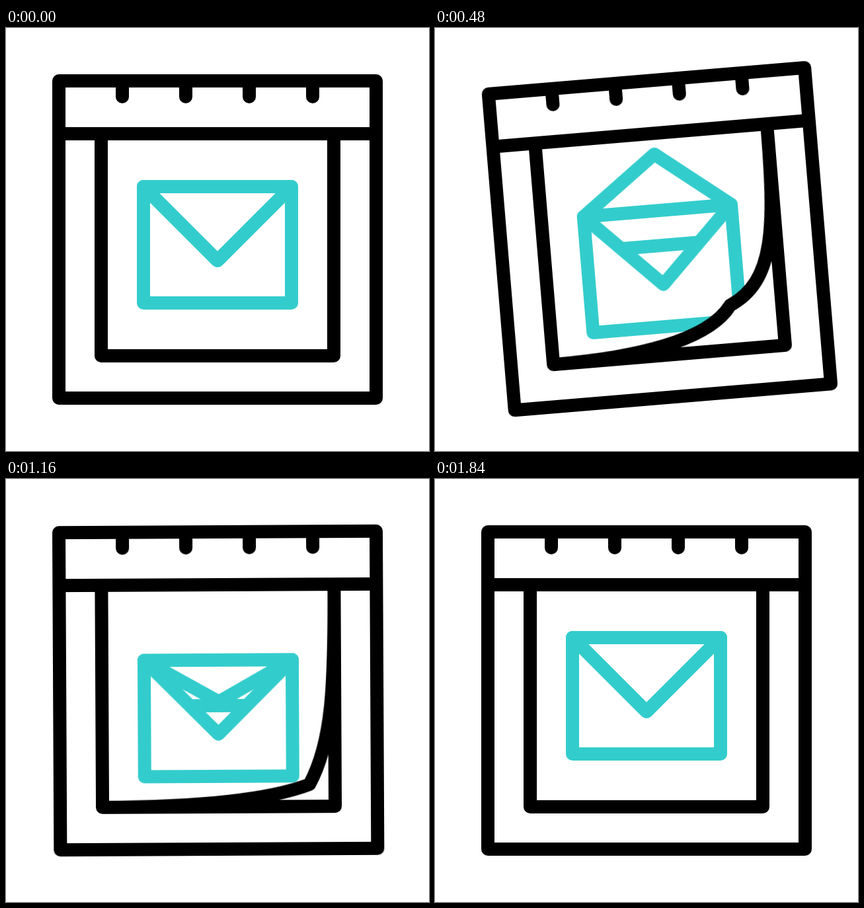
These frames come from a looping animation (640x640 px, 2 s). An HTML page without scripts:

```html
<!DOCTYPE html>
<html lang="en">
<head>
<meta charset="utf-8">
<title>Mail calendar</title>
<style>
  html, body { margin: 0; width: 100%; height: 100%; overflow: hidden; background: #fff; }
  svg { display: block; width: 100%; height: 100%; }
  path { fill: none; stroke: #000; stroke-width: 20; stroke-linecap: round; stroke-linejoin: round; }
  .mail path { stroke: #33cccc; }
  .sheet { fill: #fff; }

  .board, .mail, .flap, .line, .sheet {
    animation: 2s cubic-bezier(.333, 0, .667, 1) infinite;
  }
  .board { transform-origin: 320px 80px; animation-name: swing; }
  .mail { animation-name: shift; }
  .flap { animation-name: open; }
  .line { animation-name: rise; }
  .sheet { animation-name: curl; }

  @keyframes swing {
    0%, 92%, 100% { transform: rotate(0deg); }
    22% { transform: rotate(-5deg); }
    42% { transform: rotate(3deg); }
    64% { transform: rotate(-1deg); }
  }
  @keyframes shift {
    0%, 92%, 100% { transform: translateY(0); }
    22%, 56% { transform: translateY(37px); }
    72% { transform: translateY(-30.2px); }
  }
  @keyframes open {
    0%, 64.8%, 100% { d: path("M208 240L320 352L432 240"); }
    22%, 44% { d: path("M208 240L322.5 154.5L432 240"); }
  }
  @keyframes rise {
    0%, 69%, 100% { transform: translateY(0); }
    16%, 52.5% { transform: translateY(-59px); }
  }
  @keyframes curl {
    0% {
      d: path("M144 160V496C268 496 400 496 496 496C496 400 496 315 496 160V496H144");
      animation-timing-function: cubic-bezier(.44, 0, .476, 1);
    }
    30%, 32% { d: path("M144 160V496C268 496 379 479 413.3 425C487.5 398 496 318 496 160V496H144"); }
    82%, 100% { d: path("M144 160V496C268 496 400 496 496 496C496 400 496 315 496 160V496H144"); }
  }
</style>
</head>
<body>
<svg viewBox="0 0 640 640">
  <clipPath id="pocket"><polygon points="208,240 320,352 432,240"/></clipPath>
  <g class="board">
    <g class="mail">
      <g clip-path="url(#pocket)"><path class="line" d="M208 352H432"/></g>
      <path d="M208 240H432V416H208Z"/>
      <path d="M208 240L320 352L432 240"/>
      <path class="flap" d="M208 240L320 352L432 240"/>
    </g>
    <path class="sheet" d="M144 160V496C268 496 400 496 496 496C496 400 496 315 496 160V496H144"/>
    <path d="M80 80H560V560H80ZM80 160H560"/>
    <path d="M176 80V104M272 80V104M368 80V104M464 80V104"/>
  </g>
</svg>
</body>
</html>
```
